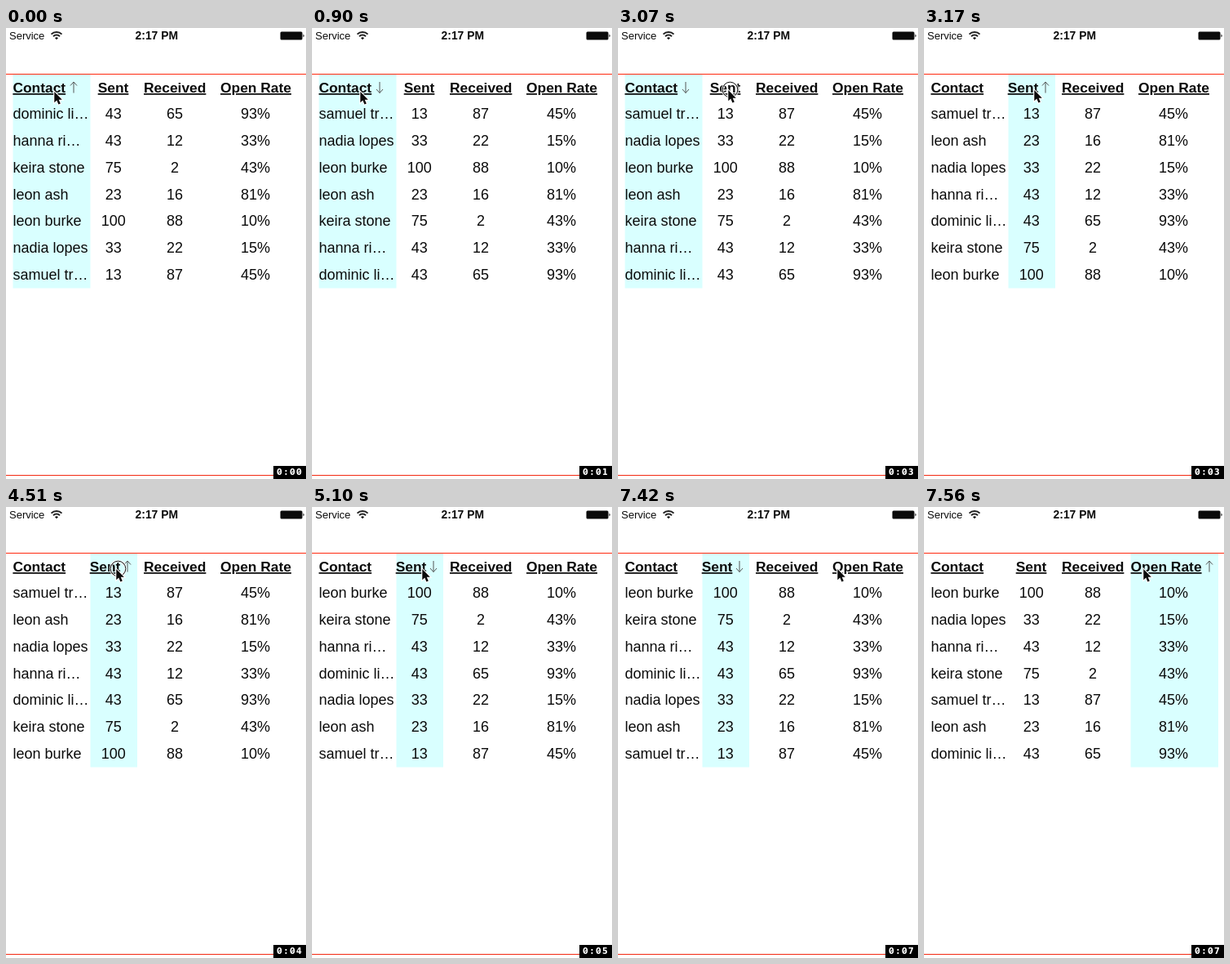
Animation of 368x552 px, one loop 8000 ms. Source, as an HTML page:

```html
<!DOCTYPE html>
<html lang="en">
<head>
<meta charset="utf-8">
<title>Sortable table</title>
<style>
  html, body { margin: 0; width: 100%; height: 100%; overflow: hidden; background: #fff; }
  svg { display: block; width: 368px; height: 552px; font: 18px "Liberation Sans", Arial, sans-serif; fill: #0b0b0b; }
  .mid { text-anchor: middle; }
  .head { font-size: 17.4px; font-weight: bold; text-decoration: underline 1.3px; text-underline-offset: 1.6px; text-decoration-skip-ink: none; }
  .line { fill: none; stroke: #222; }
  .arrow { fill: none; stroke: #555; }
  .clock { font: bold 9.7px "DejaVu Sans", sans-serif; fill: #fff; }
</style>
</head>
<body>
<svg viewBox="0 0 368 552">
  <text x="4" y="14" font-size="13">Service</text>
  <path class="line" stroke-width="2" d="M55.5 7.6a9.2 9.2 0 0 1 13 0M58 10.2a5.7 5.7 0 0 1 8 0"/>
  <path d="M62 14.2l-2-2a2.8 2.8 0 0 1 4 0z"/>
  <text x="184.8" y="14" font-size="13.9" font-weight="bold" class="mid">2:17 PM</text>
  <rect x="336.5" y="4.5" width="27" height="10" rx="1.5"/>
  <path d="M364.5 7.5q2.4 2 0 4z"/>
  <rect y="56" width="368" height="1" fill="#ff2a10"/>
  <rect y="547" width="368" height="1" fill="#f32a12"/>
  <g id="table"></g>
  <g id="ring" class="line">
    <circle r="9.3" stroke="#fff" stroke-width="3" stroke-opacity=".75"/>
    <circle r="9.3" stroke="#111"/>
  </g>
  <path id="cursor" d="M0 0V13.2L3 10.5 5.1 15.4 7.5 14.4 5.4 9.6H9.5Z" stroke="#fff" stroke-width="2.2" paint-order="stroke"/>
  <rect x="328" y="536" width="40" height="16" fill="#000"/>
  <g id="clock" class="clock"></g>
</svg>
<script>
const LOOP = 8000;
const $ = id => document.getElementById(id);

const people = [
  ["dominic li…", 43, 65, 93],
  ["hanna ri…", 43, 12, 33],
  ["keira stone", 75, 2, 43],
  ["leon ash", 23, 16, 81],
  ["leon burke", 100, 88, 10],
  ["nadia lopes", 33, 22, 15],
  ["samuel tr…", 13, 87, 45]
];

// Header position at rest and when sorted, cell centre, sort arrow, highlight span
const columns = [
  { label: "Contact", x: 8.4, sortedX: 8.4, arrow: 83, from: 8.5, to: 103.5 },
  { label: "Sent", x: 112.7, sortedX: 102.7, mid: 131.7, arrow: 149, from: 103.5, to: 161 },
  { label: "Received", x: 169, mid: 207 },
  { label: "Open Rate", x: 263, sortedX: 253.6, mid: 306, arrow: 350, from: 253.5, to: 361 }
];

const sorts = [[0, 0, 1], [750, 0, -1], [3170, 1, 1], [4660, 1, -1], [7560, 3, 1]]; // time, column, direction
const clicks = [[600, 750], [2780, 3170], [4510, 4660], [7280, 7420]];
const seconds = [900, 1940, 3070, 4070, 5100, 6150, 7030];
const moves = [ // time, x, y
  [0, 58, 77], [2040, 90, 77], [2190, 115, 78], [2340, 134, 75],
  [6300, 161, 77], [6450, 211, 82], [6590, 253, 78], [6740, 264, 76], [6880, 268, 75]
];

const text = (x, y, str, cls = "") => `<text x="${x}" y="${y}" class="${cls}">${str}</text>`;

function arrow(x, dir) {
  const tip = dir > 0 ? 66 : 79.5, tail = 145.5 - tip, barb = tip + 4.5 * dir;
  return `<path class="arrow" d="M${x} ${tail}V${tip}M${x - 4} ${barb}L${x} ${tip}L${x + 4} ${barb}"/>`;
}

// Each sort is stable, so ties keep the order of the sort before
function table(t) {
  const done = sorts.filter(s => s[0] <= t);
  const rows = [...people];
  for (const [, c, dir] of done) rows.sort((a, b) => dir * ((a[c] > b[c]) - (a[c] < b[c])));
  const [, active, dir] = done.at(-1);
  const { from, to, arrow: arrowX } = columns[active];

  let out = `<rect x="${from}" y="57" width="${to - from}" height="261.5" fill="#d9ffff"/>` + arrow(arrowX, dir);
  columns.forEach((col, c) => {
    out += text(c === active ? col.sortedX : col.x, 79, col.label, "head");
    rows.forEach((row, r) => {
      const y = Math.round(111.2 + r * 32.8);
      out += c ? text(col.mid, y, row[c] + (c === 3 ? "%" : ""), "mid") : text(col.x, y, row[c]);
    });
  });
  return out;
}

function clock(t) {
  const xs = [332, 341.5, 348, 356];
  const time = "0:0" + seconds.filter(s => s <= t).length;
  return [...time].map((ch, i) => text(xs[i], 547, ch) +
    (ch === "0" ? `<path d="M${xs[i] + 2.4} 545l2-3" stroke="#fff"/>` : "")).join("");
}

function draw(now) {
  const t = now % LOOP;
  const [, x, y] = moves.filter(m => m[0] <= t).at(-1);
  $("table").innerHTML = table(t);
  $("clock").innerHTML = clock(t);
  $("cursor").setAttribute("transform", `translate(${x + 1.3} ${y + 1.1})`);
  $("ring").setAttribute("transform", `translate(${x + 3.5} ${y + 0.5})`);
  $("ring").style.display = clicks.some(([a, b]) => t >= a && t < b) ? "" : "none";
}

const start = performance.now();
function frame() {
  draw(performance.now() - start);
  requestAnimationFrame(frame);
}
frame();
</script>
</body>
</html>
```
